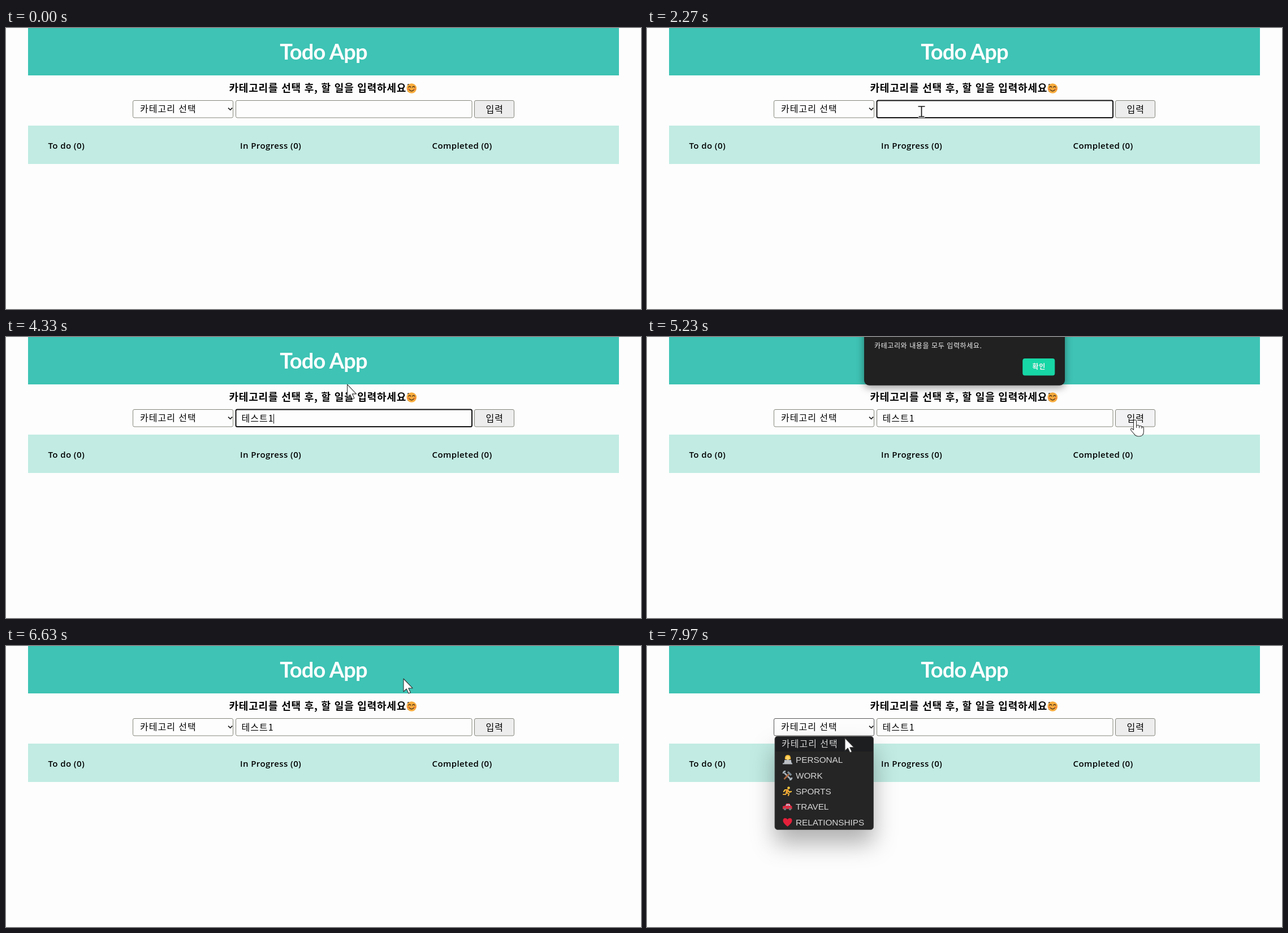
Recreate the animation shown at these times as an HTML page. Size 1123x498 px, loop 8 s.

```html
<!DOCTYPE html>
<html lang="ko">
<head>
<meta charset="utf-8">
<title>Todo App</title>
<style>
html, body { margin: 0; width: 100%; height: 100%; overflow: hidden; background: #fdfdfd }
svg { display: block; width: 1123px; height: 498px }
text { font: 16px "Noto Sans CJK KR", "Noto Sans CJK", sans-serif; letter-spacing: 1px; white-space: pre }
.title { font: 700 38px Lato, sans-serif; letter-spacing: -.8px; fill: #fff; text-anchor: middle }
.lead { font-size: 18px; font-weight: 700; letter-spacing: .8px }
.col { font: 600 15px "Open Sans", sans-serif; letter-spacing: .4px }
.box { fill: #fdfdfd; stroke: #85857c }
.small { font-size: 12px; letter-spacing: .6px; fill: #f2f2f2 }
.item { font: 15.3px "Liberation Sans", Arial, sans-serif; letter-spacing: 0; fill: #d6d6d6 }
#alert { filter: drop-shadow(0 4px 7px rgba(0,0,0,.4)) }
#menu > .panel { filter: drop-shadow(0 24px 20px rgba(0,0,0,.3)) }
#cursor path { fill: #fff; stroke: #333; stroke-width: 1.1; stroke-linejoin: round }
</style>
</head>
<body>
<svg viewBox="0 0 1123 498">
  <rect x="39" width="1045" height="84" fill="#3ec3b4"/>
  <rect x="39" y="173" width="1045" height="68" fill="#c1ebe3"/>
  <text class="title" x="561.5" y="55.5">Todo App</text>
  <text class="lead" x="394.5" y="113.3">카테고리를 선택 후, 할 일을 입력하세요!</text>
  <g transform="translate(717.3 107)" fill="none" stroke="#50351c" stroke-width="1.4" stroke-linecap="round">
    <circle r="8.8" fill="#f6ab3c" stroke="none"/>
    <path d="M-5.5-2q2-3 4 0M1.5-2q2-3 4 0M-4 2.5q4 4.5 8 0"/>
    <path d="M-6 1.5h.6M5.4 1.5h.6" stroke="#f07c3a" stroke-width="3"/>
  </g>

  <rect id="select" class="box" x="224.5" y="128.5" width="177" height="30.5" rx="2.5"/>
  <text x="237" y="149.2">카테고리 선택</text>
  <path d="M393 141.6l3.6 3.6 3.6-3.6" fill="none" stroke="#111" stroke-width="1.6"/>
  <rect id="input" class="box" x="406.5" y="128.5" width="417.5" height="30.5" rx="2.5"/>
  <text id="typed" x="416.5" y="150"></text>
  <path id="caret" d="M0 136.5v17" stroke="#111"/>
  <rect id="button" class="box" x="828.5" y="128.5" width="70" height="30.5" rx="2.5"/>
  <text x="848.5" y="150">입력</text>

  <text class="col" x="74.5" y="213.7">To do (0)</text>
  <text class="col" x="414" y="213.7">In Progress (0)</text>
  <text class="col" x="753.5" y="213.7">Completed (0)</text>

  <g id="alert">
    <rect x="384" y="-60" width="355" height="147.7" rx="9" fill="#212121"/>
    <text class="small" x="402" y="22">카테고리와 내용을 모두 입력하세요.</text>
    <rect id="confirm" x="664.8" y="40.5" width="56" height="29.3" rx="3"/>
    <text class="small" x="681.5" y="59.3" font-weight="700" style="font-weight:700">확인</text>
  </g>

  <g id="menu">
    <rect class="panel" x="226" y="160" width="174.5" height="165.5" rx="5" fill="#252525" stroke="#4a4a4a" stroke-width=".8"/>
    <rect x="227" y="161" width="172.5" height="26" rx="3" fill="#1d1e20"/>
    <text x="238" y="179" fill="#d6d6d6">카테고리 선택</text>
    <g id="items"></g>
    <g transform="translate(240 193)">
      <path d="M4 8q-1-8 5-8t5 8z" fill="#f3b632"/>
      <circle cx="9" cy="5.5" r="3.4" fill="#ffd469"/>
      <path d="M2 15q0-6 7-6t7 6z" fill="#8796a5"/>
      <path d="M3 9h12v6H3zM0 14.500h17v2H0z" fill="#bcc0c4"/>
    </g>
    <g transform="translate(240 221)" fill="none" stroke-width="2.6">
      <path d="M3 4l11 11" stroke="#aab4bc"/>
      <path d="M1 5q0-4 4-4M12 16q4 0 4-4" stroke="#aab4bc"/>
      <path d="M2.500 15L11 6" stroke="#ad6a42"/>
      <path d="M9 2l6 6" stroke="#7b8a94" stroke-width="3.500"/>
    </g>
    <g transform="translate(240 249)" fill="none" stroke-linecap="round" stroke-width="2.2">
      <circle cx="10.500" cy="2.500" r="2.300" fill="#ffc83d"/>
      <path d="M8 6l-4 0-2 3M9 7l3 3 3-1" stroke="#ffc83d"/>
      <path d="M8.500 6.500L7 10" stroke="#f29a2e" stroke-width="4"/>
      <path d="M7 11l4 2-1 3M7 11l-2 3-4 0" stroke="#e8a838"/>
    </g>
    <g transform="translate(240 276)">
      <path d="M0 13V8l4-1 2.500-4H12l2.500 4 2 1v5z" fill="#dd2e44"/>
      <path d="M5.500 7l2-3H9v3zM10 7V4h1.500l2 3z" fill="#bbdaf0"/>
      <circle cx="4" cy="13" r="2.200" fill="#777"/><circle cx="13" cy="13" r="2.200" fill="#777"/>
    </g>
    <path transform="translate(240.500 305)" d="M8 15Q0 9 0 4.500 0 0 4 0q3 0 4 2.500Q9 0 12 0q4 0 4 4.500Q16 9 8 15z" fill="#e5203a"/>
  </g>

  <g id="cursor">
    <path id="arrow" d="M0 0V23L5.200 18 9 26 12.400 24.400 8.800 16.700H16z"/>
    <g id="hand">
      <path d="M-2.500 2.500a2.500 2.500 0 0 1 5 0V10q4-2 5 1 3.500-1.500 4.500 1.200 3-.5 3.300 2V21q0 8-8.500 8-6 0-9-5L-7 18.500q-1.500-4 1.500-3.500L-2.500 17.500z"/>
      <path d="M2.500 10v4M7.500 11v3.500M12 12.200v3" fill="none"/>
    </g>
    <g id="beam" fill="none">
      <path d="M-6-9H6M0-9V9M-6 9H6" style="stroke:#fff;stroke-width:4"/>
      <path d="M-6-9H6M0-9V9M-5 9H5" style="stroke:#111;stroke-width:1.700"/>
    </g>
  </g>
</svg>
<script>
const $ = id => document.getElementById(id);
const show = (id, on) => $(id).style.display = on ? '' : 'none';
const set = (id, attrs) => { for (const k in attrs) $(id).style[k] = attrs[k]; };

const LOOP = 8000, FOCUS = 1750, TYPE = 2550, KEY = 215;
const OPEN = 4970, CLOSE = 6600, MENU = 7400;
const strokes = ['', 'ㅌ', '테', '텟', '테스', '테슽', '테스트', '테스트1'];
const LAST_KEY = TYPE + KEY * (strokes.length - 2);

// Pointer stops: time, x, y
const stops = [
  [350, 1118, 490], [870, 858, 222], [1600, 485.500, 148], [3950, 485.500, 148],
  [4330, 603, 84], [4800, 863, 147], [5300, 863, 147], [6100, 703, 58],
  [6650, 703, 58], [7150, 370, 133], [7550, 370, 133], [7900, 350, 163], [LOOP, 350, 163]
];

['PERSONAL', 'WORK', 'SPORTS', 'TRAVEL', 'RELATIONSHIPS'].forEach((name, i) => {
  $('items').innerHTML += `<text class="item" x="263" y="${207 + 27.75 * i}">${name}</text>`;
});

function pointer(t) {
  const i = Math.max(1, stops.findIndex(s => s[0] > t));
  const [t0, x0, y0] = stops[i - 1], [t1, x1, y1] = stops[i];
  const p = Math.max(0, (t - t0) / (t1 - t0));
  const e = i === 1 || i === 4 || i === 5 ? p : p * p * (3 - 2 * p);
  return [x0 + (x1 - x0) * e, y0 + (y1 - y0) * e];
}

function draw(t) {
  const [x, y] = pointer(t);
  const alertOn = t >= OPEN && t < CLOSE, menuOn = t >= MENU;
  const focused = t >= FOCUS && t < OPEN - 50;
  const over = (l, r) => x >= l && x <= r && y >= 128 && y <= 159;
  const onSelect = over(224, 402) && !alertOn && !menuOn;
  const hand = onSelect || over(828, 899) && t <= 5300;
  const beam = over(406, 825) && !alertOn;

  set('input', { stroke: focused ? '#111' : '#85857c', strokeWidth: focused ? 2 : 1 });
  set('select', { stroke: onSelect || menuOn ? '#555' : '#85857c' });
  set('button', { fill: alertOn ? '#f2f2f4' : '#ededed' });

  const key = Math.floor((t - TYPE) / KEY) + 1;
  $('typed').textContent = strokes[Math.max(0, Math.min(strokes.length - 1, key))];
  const since = t < TYPE ? t - FOCUS : t - Math.min(LAST_KEY, TYPE + KEY * (key - 1));
  show('caret', focused && since % 1000 < 500);
  $('caret').setAttribute('transform', `translate(${Math.round(416 + $('typed').getComputedTextLength()) + .5} 0)`);

  show('alert', alertOn);
  const left = 1 - Math.min(1, Math.max(0, (t - OPEN) / 437));
  $('alert').setAttribute('transform', `translate(0 ${-30 * left ** 3})`);
  set('alert', { opacity: Math.min(1, (t - OPEN) / 100) });
  const hover = x > 664 && x < 721 && y > 40 && y < 70;
  set('confirm', { fill: hover ? '#1d7761' : '#17d7a6', stroke: hover ? '#1fb893' : '#17d7a6' });

  show('menu', menuOn);
  show('cursor', t >= 350 && t < TYPE || t >= 3950);
  $('cursor').setAttribute('transform', `translate(${x} ${y})`);
  show('hand', hand);
  show('beam', beam);
  show('arrow', !hand && !beam);
}

function tick() {
  draw(performance.now() % LOOP);
  requestAnimationFrame(tick);
}
tick();
</script>
</body>
</html>
```
